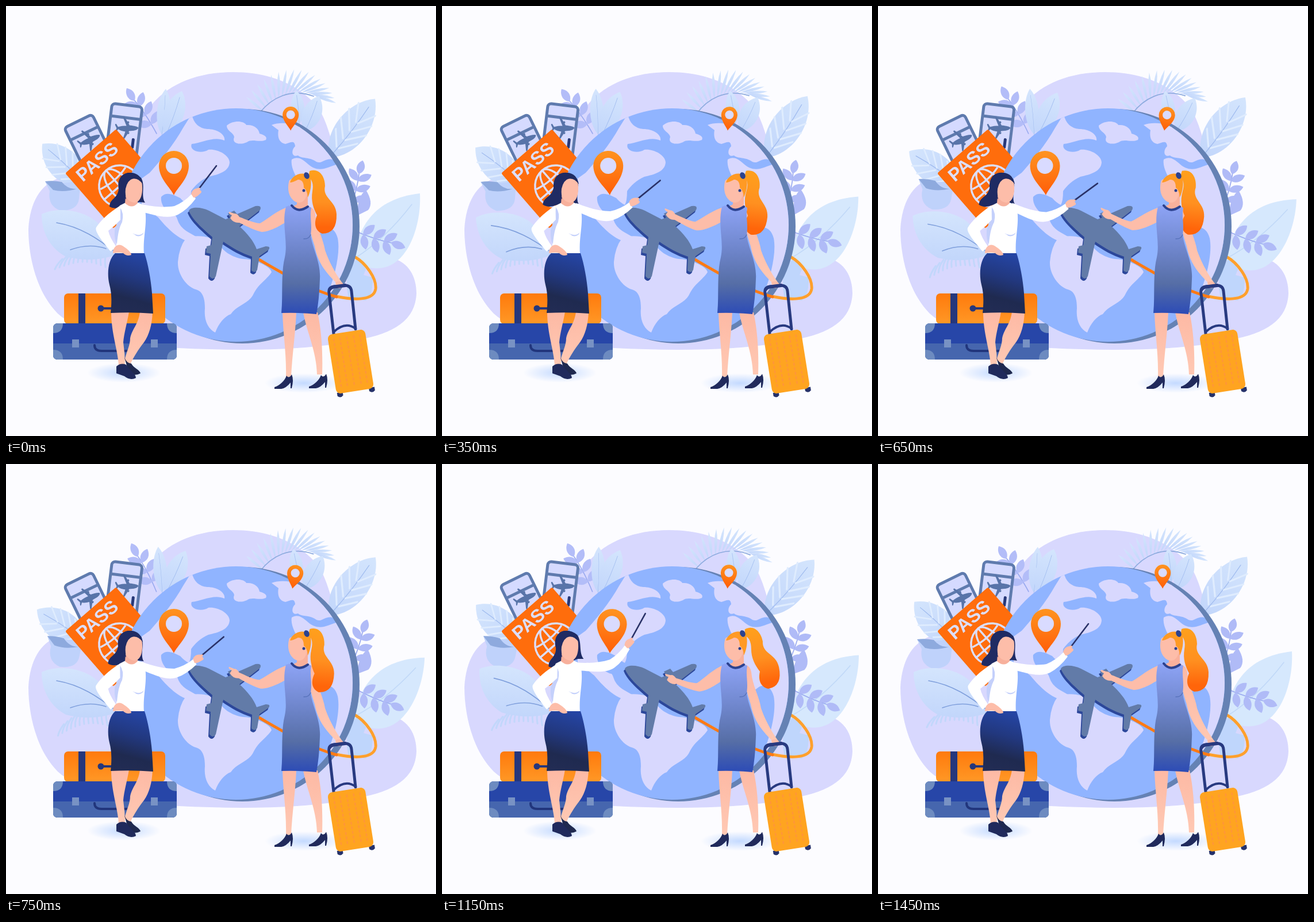
Animation of 748 by 748 pixels, one loop 1500 ms. Source, as an HTML page:

```html
<!DOCTYPE html>
<html lang="en">
<head>
<meta charset="utf-8">
<title>Travel agency</title>
<style>
html, body { margin: 0; width: 100%; height: 100%; overflow: hidden; background: #fcfcff; }
svg { display: block; width: 100%; height: 100%; }
.line { fill: none; stroke-linecap: round; stroke-linejoin: round; }
</style>
</head>
<body>
<svg viewBox="0 0 748 748">
<defs>
  <linearGradient id="pale" x2="0" y2="1"><stop stop-color="#d4e5fd"/><stop offset="1" stop-color="#c2d6fb"/></linearGradient>
  <linearGradient id="flame" x2="0" y2="1"><stop stop-color="#ffa01c"/><stop offset=".5" stop-color="#ff9020"/><stop offset=".9" stop-color="#ff650a"/></linearGradient>
  <linearGradient id="marker" x2="0" y2="1"><stop stop-color="#ff9420"/><stop offset="1" stop-color="#ff5d08"/></linearGradient>
  <linearGradient id="dress" x2="0" y2="1"><stop stop-color="#8ea4f6"/><stop offset=".4" stop-color="#6f86cc"/><stop offset=".72" stop-color="#566ea6"/><stop offset="1" stop-color="#2c4bb6"/></linearGradient>
  <linearGradient id="skirt" x1=".6" x2=".4" y2="1"><stop stop-color="#2545a4"/><stop offset=".4" stop-color="#22387f"/><stop offset=".75" stop-color="#1f2a50"/><stop offset="1" stop-color="#222c54"/></linearGradient>
  <linearGradient id="bag" x2="0" y2="1"><stop stop-color="#ff7a0c"/><stop offset="1" stop-color="#ff9826"/></linearGradient>
  <linearGradient id="skin" x2="0" y2="1"><stop stop-color="#fdb9a4"/><stop offset="1" stop-color="#ffc9b4"/></linearGradient>
  <radialGradient id="floor"><stop stop-color="#c4daff"/><stop offset="1" stop-color="#fcfcff"/></radialGradient>
  <clipPath id="disc"><circle cx="400" cy="381" r="203"/></clipPath>

  <g id="leaf">
    <path d="M0 0C-45-25-42-75 0-100C42-75 45-25 0 0Z"/>
    <path class="line" d="M0 0Q5-45 0-86" stroke="#9db9ee" stroke-width="1.4"/>
  </g>
  <g id="ribbed">
    <use href="#leaf"/>
    <path class="line" d="M4-18L28-38M4-32L32-54M4-46L29-68M3-60L22-82M-2-18L-26-36M-2-32L-32-52M-2-46L-30-68M-2-60L-22-82" stroke="#dfecfe" stroke-width="3"/>
  </g>
  <path id="leaflet" d="M0 0C-9-7-7-19 1-25C9-17 9-7 0 0Z"/>
  <g id="sprig">
    <path class="line" d="M0 0Q4-40 0-70" stroke="#9aaaf0" stroke-width="1.6"/>
    <use href="#leaflet" transform="translate(0-66)"/>
    <use href="#leaflet" transform="translate(1-54)rotate(48)"/><use href="#leaflet" transform="translate(1-54)rotate(-48)"/>
    <use href="#leaflet" transform="translate(2-36)rotate(54)"/><use href="#leaflet" transform="translate(2-36)rotate(-54)"/>
    <use href="#leaflet" transform="translate(2-18)rotate(60)"/><use href="#leaflet" transform="translate(2-18)rotate(-60)"/>
  </g>
  <path id="plane" d="M318 356C322 348 341 350 353 356L382 371L390 368L386 361L397 356L402 362L434 348Q446 346 442 355L406 383C420 396 431 409 436 423L452 418Q461 418 457 424L441 435L437 459Q433 466 427 460L428 436C410 430 394 421 378 410L365 470Q360 478 354 470L356 431L348 429L349 418L357 416L359 402C343 388 324 372 318 356Z"/>
  <g id="pin">
    <path d="M292 329C286 316 266 300 266 278A26 26 0 0 1 318 278C318 300 298 316 292 329Z" fill="url(#marker)"/>
    <circle cx="292" cy="278" r="14" fill="#d9dbff"/>
  </g>
</defs>

<path d="M39 388C42 340 60 312 90 300C150 280 200 250 235 200C262 145 320 115 395 115C470 115 520 145 545 180C572 225 575 300 605 360C620 420 640 434 670 438C700 445 714 470 714 500C712 550 670 572 600 583C520 600 400 600 300 595C200 590 130 570 90 535C55 500 39 440 39 388Z" fill="#d8d8fe"/>

<g fill="url(#pale)">
  <g data-o="135 300" data-k="-2 -8 -10 -8 -4"><use href="#ribbed" transform="translate(138 312)rotate(-46)scale(.82 1.04)"/></g>
  <g data-o="125 340" data-k="-2 1 6 7 6">
    <path d="M68 305Q95 312 130 303L127 335Q125 356 95 356Q72 348 76 322Z" fill="#bfd2fb"/>
    <path d="M68 305Q82 303 97 306Q108 320 124 318Q100 325 82 320Z" fill="#8eaade"/>
  </g>
  <g data-o="180 430" data-k="-2 -7 -9 -6 -3" id="fern" class="line" stroke="#c2d7fb" stroke-width="3"></g>
  <g data-o="190 430" data-k="-1.7 -3 0 2 2.5">
    <path d="M62 362C90 348 140 355 162 380Q184 402 194 432Q150 448 104 436C75 420 62 392 62 362Z"/>
    <path class="line" d="M88 377C130 384 160 405 190 428M112 424Q145 412 174 422" stroke="#7f9fdc" stroke-width="1.6"/>
  </g>
  <g data-o="262 218" data-k="-2 0 6 9 6" fill="#b3bdf8"><use href="#sprig" transform="translate(262 222)rotate(-34)scale(1.04)"/></g>
  <g data-o="270 220" data-k="-5 -10 -10 -8 -4"><use href="#leaf" transform="translate(271 224)rotate(5)scale(.36 .8)"/></g>
  <g data-o="275 222" data-k="1.5 4 5 5 3"><use href="#leaf" transform="translate(278 225)rotate(20)scale(.54 .82)"/></g>
  <g data-o="510 180" data-k="-1.5 -3 -1 1.5 2.5">
    <g id="palm"></g>
    <path class="line" d="M442 185C462 160 495 142 535 157" stroke="#8facdf" stroke-width="1.8"/>
  </g>
  <g data-o="510 205" data-k="-2 -5 -5 -3 -1"><use href="#leaf" transform="translate(510 205)rotate(-5)scale(.35 .58)"/></g>
  <g data-o="520 210" data-k="2 7 7 6 3"><use href="#leaf" transform="translate(520 218)rotate(22)scale(.5 .66)"/></g>
  <g data-o="565 255" data-k="-2 -4.5 .5 4.5 3.5"><use href="#ribbed" transform="translate(562 264)rotate(38)scale(.84 1.3)"/></g>
  <g data-o="600 360" data-k="-2.5 -2 5 8 6" fill="#b0bbf7">
    <use href="#sprig" transform="translate(598 355)rotate(14)scale(1.08 .98)"/>
    <path d="M610 365Q612 330 626 320Q640 342 630 355Z"/>
  </g>
  <g data-o="600 425" data-k="1 4 5 4.6 3">
    <path d="M605 440C612 385 640 335 720 326C723 380 700 452 650 456Q620 458 605 440Z" fill="#d6e8fd"/>
    <path class="line" d="M608 438Q660 405 706 345" stroke="#c0d8f8" stroke-width="1.5"/>
  </g>
  <g data-o="608 400" data-k="-2 -2 5 8 5.5" fill="#b0bbf7"><use href="#sprig" transform="translate(604 390)rotate(108)scale(1.05)"/></g>
  <path d="M596 508Q585 460 613 438L626 458L622 468L637 472Q640 500 626 512Z" fill="#bfd6fc"/>
</g>

<g stroke="#5f7bae" stroke-width="5" fill="#d5daff">
  <g transform="translate(99 212)rotate(-26)">
    <rect x="2" y="1" width="54" height="90" rx="6"/><path d="M2 25H56"/>
  </g>
  <g transform="translate(183 166)rotate(7)">
    <rect x="2" y="3" width="53" height="90" rx="6"/><path d="M2 25H55"/>
  </g>
</g>
<g fill="#5874a9">
  <use href="#plane" transform="translate(142 232)rotate(122)scale(.26)translate(-386-409)"/>
  <use href="#plane" transform="translate(208 210)rotate(146)scale(.26)translate(-386-409)"/>
  <rect x="218" y="230" width="5" height="18" rx="2" fill="#273878" transform="rotate(7 220 239)"/>
</g>
<g transform="translate(103 291)rotate(-41)">
  <rect width="117" height="127" rx="3" fill="#ff6d0c"/>
  <text x="55" y="32" text-anchor="middle" font-family="Liberation Sans, Arial, sans-serif" font-weight="700" font-size="32" fill="#dddfff">PASS</text>
  <g fill="none" stroke="#dddfff" stroke-width="3.4">
    <circle cx="57" cy="79" r="36"/><ellipse cx="57" cy="79" rx="17" ry="36"/>
    <path d="M57 43V115M21 79H93M28 61Q57 69 86 61M28 97Q57 89 86 97"/>
  </g>
</g>

<path class="line" d="M606 436C626 447 645 474 643 492C640 514 602 512 565 503" stroke="#ffa02c" stroke-width="5"/>
<circle cx="411" cy="383" r="204" fill="#6582b4"/>
<circle cx="400" cy="381" r="203" fill="#90b4ff"/>
<g clip-path="url(#disc)" fill="#d8d8fe">
  <path d="M323 188Q328 212 350 214C368 214 382 224 380 234C362 226 342 238 323 240C318 252 340 258 352 250C366 248 388 258 389 272C388 288 370 293 352 297C338 303 328 313 322 322Q322 340 318 346Q310 342 303 334C292 328 278 322 270 332C268 345 280 362 295 365C300 370 297 382 318 394L332 402L313 408C296 402 278 384 265 368L236 345V300L250 290Q290 245 308 212Z"/>
  <path d="M313 404C330 396 360 402 371 410C372 425 395 438 412 440C430 440 460 452 462 463C452 478 440 482 430 502C422 518 402 520 391 536C380 540 370 552 364 568C352 562 344 548 346 526C346 508 342 496 330 493C314 488 298 466 299 445Q301 420 313 404Z"/>
  <path d="M384 208C396 198 414 200 418 207C432 206 440 214 441 222Q456 226 452 233C440 238 428 230 419 237C408 242 392 240 397 228C396 220 384 218 384 208Z"/>
  <path d="M462 207Q480 200 510 208L560 245L570 268C556 262 550 276 540 271C528 262 514 266 508 260C496 264 496 250 503 244C502 232 494 238 486 240C474 238 472 226 474 216Z"/>
  <path d="M497 267C512 257 523 276 534 281C550 288 560 280 574 276L630 300V480L560 500C572 470 582 430 577 404C572 385 558 380 546 392C530 390 520 350 512 320C510 300 494 285 497 267Z"/>
</g>
<g data-o="291 329" data-k="-2 -3.5 0 3 4"><use href="#pin"/></g>
<g data-o="496 233" data-k="4 8 10.5 9 5"><use href="#pin" transform="translate(337.5 39)scale(.54)"/></g>

<path class="line" d="M438 440C480 464 525 492 575 506" stroke="#ff7a14" stroke-width="5"/>
<use href="#plane" x="-2" y="4" fill="#2c479a"/>
<use href="#plane" fill="#627ba8"/>

<ellipse cx="205" cy="638" rx="64" ry="17" fill="url(#floor)"/>
<ellipse cx="518" cy="656" rx="68" ry="17" fill="url(#floor)"/>

<rect x="101" y="500" width="176" height="53" rx="7" fill="url(#bag)"/>
<path d="M126 500H138V553H126ZM240 500H252V553H240Z" fill="#26377c"/>
<path class="line" d="M166 526H205" stroke="#26377c" stroke-width="4"/><circle cx="165" cy="526" r="5.5" fill="#26377c"/>
<rect x="82" y="552" width="215" height="63" rx="8" fill="#2746a8"/>
<path d="M82 587H297V607Q297 615 289 615H90Q82 615 82 607Z" fill="#4666ae"/>
<path d="M82 569V560Q82 552 90 552H99Q99 569 82 569ZM297 569V560Q297 552 289 552H280Q280 569 297 569ZM82 598V607Q82 615 90 615H99Q99 598 82 598ZM297 598V607Q297 615 289 615H280Q280 598 297 598Z" fill="#6d8bc0"/>
<path d="M115 580H127V594H115ZM252 580H264V594H252Z" fill="#7892c4"/>
<path class="line" d="M154 590Q154 600 166 600H212Q224 600 224 590" stroke="#21357c" stroke-width="4"/>

<g id="guide">
  <path d="M183 532H214C211 550 205 570 204 585Q207 605 207 624L196 626C195 600 183 570 183 532Z" fill="url(#skin)"/>
  <path d="M233 532H255C254 555 249 572 240 585C230 598 222 610 216 624L206 617C210 600 216 590 216 578C220 560 230 555 233 532Z" fill="url(#skin)"/>
  <path d="M206 611Q210 622 218 622C222 630 233 633 234 639Q225 644 214 640Z" fill="#1f294f"/>
  <path d="M192 627Q200 620 209 624C215 634 226 640 226 647Q216 652 206 644Q198 641 192 639Z" fill="#202a5c"/>
  <g data-o="216 298" data-k="3 7 3 -5 -6">
    <path d="M214 290C196 292 194 308 196 318C194 336 181 334 180 349Q190 355 203 348L232 341L242 342C234 330 243 312 235 299Q226 290 214 290Z" fill="#1f2b63"/>
  </g>
  <path d="M198 347Q204 344 208 342Q218 352 229 342Q240 345 242 354C246 382 238 400 240 431H191C195 395 188 365 198 347Z" fill="#fff"/>
  <path d="M208 330H229V343Q219 354 207 343Z" fill="#f7b09c"/>
  <path d="M207 308Q222 294 236 305C239 322 236 342 223 342Q209 340 207 324Z" fill="#fdbda9"/>
  <path d="M198 318C196 296 206 289 218 290Q234 291 238 310Q230 299 221 300Q211 303 208 318Q207 328 209 336Q199 330 198 318Z" fill="#1f2b63"/>
  <path d="M198 350Q206 360 202 376Q195 388 193 414Q188 408 189 390Q196 370 198 350ZM220 395Q231 402 240 394Q236 402 227 400Z" fill="#c4d0fb"/>
  <g data-o="188 428" data-k="-.5 -1.5 -.5 1 1.5">
    <path d="M199 347C178 360 164 374 157 385C153 392 170 412 182 427L192 419Q180 402 178 391Q190 382 199 372Z" fill="#fff"/>
  </g>
  <path d="M190 430H241C247 448 252 475 254 500L256 535Q220 532 182 534C184 515 184 500 180 485C175 465 178 440 190 430Z" fill="url(#skirt)"/>
  <path d="M186 428C188 415 198 413 204 418Q218 427 218 433Q210 436 204 430Q198 428 186 430Z" fill="#fdbda9"/>
  <g data-o="240 352" data-k="5.5 12.5 8.5 -3.5 -8.5">
    <path d="M232 344C255 349 275 351 293 348Q310 341 323 327L330 335Q316 354 299 363C280 372 255 362 238 359Z" fill="#fff"/>
    <g data-o="328 331" data-k="1 6 4 2 0">
      <path class="line" d="M334 320L366 278" stroke="#2a3268" stroke-width="2.6"/>
      <path d="M322 327Q324 318 333 317Q340 314 337 320Q343 323 337 327Q330 334 326 333Z" fill="#fdbda9"/>
    </g>
  </g>
</g>

<g id="traveller">
  <path d="M481 533H505C503 575 498 605 496 645H487C488 605 482 570 481 533ZM517 533H542C550 570 551 610 550 641H541C540 600 524 570 517 533Z" fill="url(#skin)"/>
  <path id="shoe" d="M467 663C476 660 485 652 488 643Q492 649 497 641Q501 650 497 665H495V655Q487 665 479 666H467Z" fill="#202a5c"/>
  <use href="#shoe" x="60" y="-1"/>
  <path d="M526 349Q536 350 538 362C540 385 552 405 555 425C562 445 573 465 583 479Q590 488 582 490Q573 492 573 480C555 462 542 445 537 418Q528 390 524 370Z" fill="url(#skin)"/>
  <g data-o="530 294" data-k="5 8 3.5 -8 -10">
    <path d="M528 287C546 281 555 298 555 313C550 335 574 338 575 362Q576 396 550 396C536 390 536 376 541 364C535 352 530 340 533 322Q536 304 526 298Z" fill="url(#flame)"/>
  </g>
  <path d="M506 325H525V347Q536 352 526 362H494Q488 354 506 345Z" fill="#f9b19c"/>
  <path d="M493 303Q510 292 524 306C526 325 522 343 508 342C492 338 488 318 493 303Z" fill="#fdbda9"/>
  <path d="M494 307C499 291 520 287 529 297C533 310 529 325 525 333Q524 320 518 316Q518 302 508 302Q499 307 494 307Z" fill="#ff9a24"/>
  <ellipse cx="523" cy="295" rx="4.5" ry="6" fill="#2c428f" transform="rotate(-25 523 295)"/>
  <circle cx="518" cy="321" r="2.5" fill="#2c428f"/>
  <g data-o="487 355" data-k="2 4.5 3 -2.5 -4">
    <path d="M492 349C472 355 456 370 442 378C432 378 417 371 406 367Q402 360 397 361L388 358Q386 361 393 364L390 369Q396 378 406 377C420 384 435 391 445 393C462 392 480 380 490 374Z" fill="#fdbda9"/>
  </g>
  <path d="M487 349L497 346Q508 362 525 348L531 351C528 368 533 380 530 398C532 420 548 445 546 475Q545 510 540 536Q510 533 479 534C482 500 478 465 485 437C491 410 479 380 487 349Z" fill="url(#dress)"/>
  <path class="line" d="M497 347Q508 361 525 349" stroke="#2c428f" stroke-width="4"/>
  <path class="line" d="M530 398Q526 406 518 405" stroke="#5873bb" stroke-width="1.5"/>
</g>

<g class="line" stroke="#283a80">
  <path d="M570 570L562 500Q560 489 571 488L589 486Q600 486 601 496L608 562" stroke-width="5"/>
  <path d="M570 567Q590 548 608 561" stroke-width="4"/>
</g>
<path d="M573 481Q581 475 588 485Q586 491 577 491Z" fill="#fdbda9"/>
<path class="line" d="M563 493Q566 488 575 488L590 486" stroke="#283a80" stroke-width="6"/>
<g transform="translate(599.5 618.5)rotate(-9)">
  <path d="M-32 50h10v6q-5 5-10 0ZM24 50h10v6q-5 5-10 0Z" fill="#26326a"/>
  <rect x="-33" y="-52" width="66" height="104" rx="8" fill="#ffa420"/>
  <path class="line" d="M-23-43V43M-12-43V43M0-43V43M12-43V43M23-43V43" stroke="#ff9638" stroke-width="2.5" stroke-dasharray="3 5"/>
</g>
</svg>
<script>
const TIMES = [0, 200, 500, 750, 950, 1150, 1450], LOOP = 1450;
const at = (i, list, wrap) => list[(i + 6) % 6] + Math.floor(i / 6) * wrap;

// Periodic Hermite curve through a part's key angles.
function angleAt(keys, t) {
  let i = 0;
  while (i < 5 && t >= TIMES[i + 1]) i++;
  const time = n => at(n, TIMES, LOOP), key = n => at(n, keys, 0);
  const slope = n => (key(n + 1) - key(n - 1)) / (time(n + 1) - time(n - 1));
  const span = time(i + 1) - time(i), u = (t - time(i)) / span, v = 1 - u;
  return key(i) * v * v * (1 + 2 * u) + key(i + 1) * u * u * (3 - 2 * u)
    + span * u * v * (slope(i) * v - slope(i + 1) * u);
}

function spikes(id, count, shape) {
  document.getElementById(id).innerHTML =
    Array.from({ length: count }, (_, i) => shape(i / (count - 1))).join('');
}
spikes('palm', 17, u => {
  const x = 444 + 98 * u, y = 180 - 76 * u * (1 - u) - 22 * u;
  const length = 34 + 10 * Math.sin(Math.PI * u);
  return `<path transform="translate(${x} ${y})rotate(${-50 + 158 * u})" d="M0 4Q-5-${length / 2} 0-${length}Q5-${length / 2} 0 4"/>`;
});
spikes('fern', 12, u => {
  const x = 98 + 82 * u, y = 440 - 22 * Math.sin(Math.PI * u * .7);
  return `<path d="M${x} ${y}q-10 10-${13 - 6 * u} ${18 + 14 * u}"/>`;
});

const parts = [...document.querySelectorAll('[data-k]')].map(el => ({
  el, pivot: el.dataset.o, keys: [0, ...el.dataset.k.split(' ').map(Number)]
}));

function draw() {
  const t = Math.floor(performance.now() % 1500 / 50) * 50;
  for (const { el, pivot, keys } of parts)
    el.setAttribute('transform', `rotate(${angleAt(keys, t)} ${pivot})`);
  requestAnimationFrame(draw);
}
draw();
</script>
</body>
</html>
```
